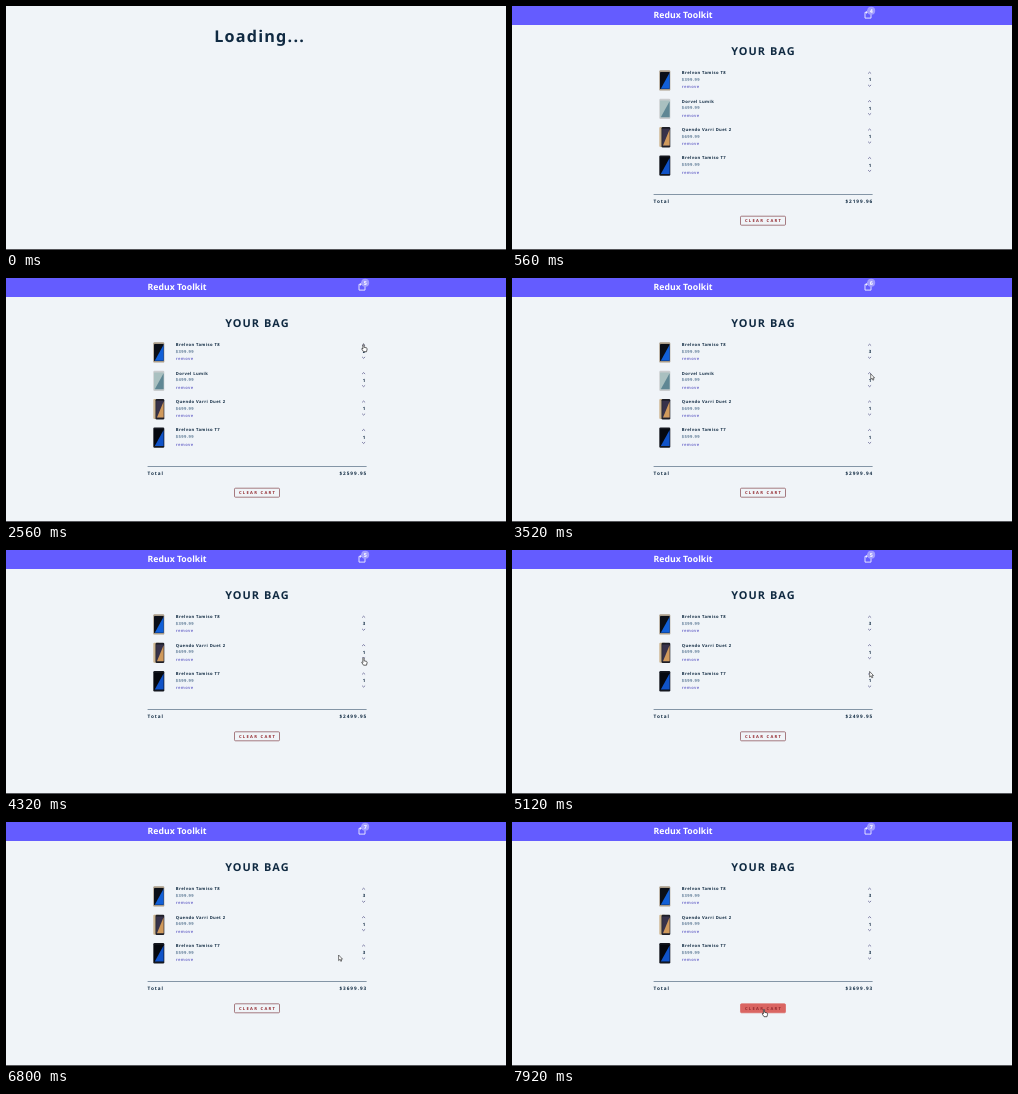
Animation of 500x244 px, one loop 8 s. Source, as an HTML page:

```html
<!DOCTYPE html>
<html lang="en">
<head>
<meta charset="utf-8">
<title>Shopping bag</title>
<style>
  html, body { margin: 0; width: 100%; height: 100%; overflow: hidden; background: #f0f4f8; }
  svg { display: block; width: 500px; height: 244px; }
  text { font-family: "Noto Sans", "Open Sans", sans-serif; font-weight: 700; text-rendering: geometricPrecision; }
</style>
</head>
<body>
<svg id="stage" viewBox="0 0 500 244"></svg>
<script>
const LOOP = 8000, LOADED = 480, HOVER = 7440;
const NAVY = '#102a42', PURPLE = '#645cff', GREY = '#617d98';
const stage = document.getElementById('stage');

const items = [
  { name: 'Brelvon Tamiso T8', price: 399.99, frame: '#a89a86', screen: '#0b0f18', glow: '#1260d8', steps: [2120, 2880] },
  { name: 'Dorvel Lumik', price: 499.99, frame: '#c9ccce', screen: '#a9c0c0', glow: '#5f8794', removed: 3920 },
  { name: 'Quendo Varri Duet 2', price: 699.99, frame: '#1d1e26', screen: '#37324a', glow: '#d09a5c', back: '#cdb692' },
  { name: 'Brelvon Tamiso T7', price: 599.99, frame: '#14171f', screen: '#05080f', glow: '#1053c8', steps: [5920, 6320] }
];

// time, x, y of the pointer tip, and its shape from then on
const track = [
  [960, 372, 108, 'arrow'], [1440, 366, 69, 'arrow'], [1680, 366, 69, 'arrow'],
  [1920, 357.5, 66, 'hand'], [3200, 357.5, 66, 'hand'], [3280, 361, 74, 'arrow'],
  [3680, 357.5, 107.5, 'hand'], [4480, 357.5, 107.5, 'hand'], [4560, 361, 110, 'arrow'],
  [5200, 357.5, 122, 'hand'], [5760, 357.5, 122, 'ring'], [5920, 357.5, 122, 'hand'],
  [6400, 357.5, 122, 'hand'], [6480, 353, 126, 'arrow'],
  [6720, 332.6, 133, 'arrow'], [6960, 332.6, 133, 'arrow'],
  [HOVER, 252, 187, 'hand'], [LOOP, 252, 187, 'hand']
];

const shapes = {
  arrow: '<path d="M0 0v5.6l1.3-1.2.9 2 .9-.4-.9-1.9h1.7z" fill="#fff" stroke="#222" stroke-width=".6"/>',
  hand: '<path d="M-.6.7q.6-1.1 1.2 0v2.6l2.4.6q.8.3.6 1.3l-.6 2.5H0L-1.7 5.1q-.1-1 .7-.6l.4.4z" fill="#fff" stroke="#222" stroke-width=".7"/>',
  ring: '<circle cx="1.6" cy="4.2" r="2.9" fill="#f7f9fb" stroke="#333" stroke-width=".7" stroke-dasharray="5 1.5"/>'
};

const text = (s, x, y, size, fill, gap = 0, anchor = 'start') =>
  `<text x="${x}" y="${y}" font-size="${size}" fill="${fill}" letter-spacing="${gap}" text-anchor="${anchor}">${s}</text>`;

const rect = (x, y, w, h, fill, rx = 0, extra = '') =>
  `<rect x="${x}" y="${y}" width="${w}" height="${h}" rx="${rx}" fill="${fill}" ${extra}/>`;

const chevron = (y, up) =>
  `<path d="M356.1 ${y}l1.5 ${up ? -1.4 : 1.4} 1.5 ${up ? 1.4 : -1.4}" fill="none" stroke="#514f85" stroke-width=".7"/>`;

const count = (item, t) => 1 + (item.steps || []).filter(s => t >= s).length;

function phone(item, y) {
  const x = item.back ? 149.5 : 147.3, w = 158.3 - x;
  return (item.back ? rect(147.3, y, 6, 20, item.back, 1) : '') +
    rect(x, y, w, 20.3, item.frame, 1.2) +
    rect(x + .7, y + 1.7, w - 1.4, 16.9, item.screen, .4) +
    `<path d="M157.6 ${y + 2.5}v16h-${w - 2.2}z" fill="${item.glow}"/>`;
}

function row(item, y, t) {
  return phone(item, y - 2) +
    text(item.name, 169.8, y + 1.8, 4.15, NAVY, .4) +
    text('$' + item.price, 169.8, y + 8.4, 4.1, GREY, .42) +
    text('remove', 169.8, y + 16.1, 4.1, '#7c79cf', .38) +
    chevron(y + 1.3, true) + chevron(y + 12.6, false) +
    text(count(item, t), 357.9, y + 9, 4.4, NAVY, 0, 'middle');
}

function header(n) {
  return rect(0, 0, 500, 19, PURPLE) +
    text('Redux Toolkit', 141.6, 12.2, 8.7, '#fff') +
    '<path d="M353 6.3h6v5.8h-6zM354.4 7.6V5.7q1.6-2.4 3.2 0v1.9" fill="none" stroke="#fff" stroke-width=".8"/>' +
    '<circle cx="359.2" cy="4.8" r="4" fill="#a29dff"/>' +
    text(n, 359.2, 6.8, 5.4, '#fff', 0, 'middle');
}

function bag(t) {
  const list = items.filter(i => !(t >= i.removed));
  const total = list.reduce((sum, i) => sum + i.price * count(i, t), 0);
  const n = list.reduce((sum, i) => sum + count(i, t), 0);
  const end = 188 - (4 - list.length) * 28.4;
  const hover = Math.max(0, Math.min(1, (t - HOVER) / 300));
  return header(n) +
    text('YOUR BAG', 251.4, 48.8, 10.9, NAVY, 1.05, 'middle') +
    list.map((item, i) => row(item, 66.3 + i * 28.4, t)).join('') +
    rect(141.6, Math.floor(end), 219, 1, '#8495a6') +
    text('Total', 141.6, end + 8.7, 4.7, NAVY, .95) +
    text('$' + total.toFixed(2), 361.2, end + 8.7, 4.7, NAVY, .95, 'end') +
    rect(228.5, end + 22.2, 45, 9, '#da6562', 1, `fill-opacity="${hover}" stroke="${hover > .5 ? '#da6562' : '#85454c'}" stroke-width=".7"`) +
    text('CLEAR CART', 251.6, end + 28.3, 4.1, '#93282e', 1.3, 'middle');
}

function pointer(t) {
  const i = track.findIndex(k => t < k[0]);
  if (i < 1) return '';
  const [t0, x0, y0, shape] = track[i - 1], [t1, x1, y1] = track[i];
  const p = (t - t0) / (t1 - t0), e = p * p * (3 - 2 * p);
  return `<g transform="translate(${x0 + (x1 - x0) * e} ${y0 + (y1 - y0) * e})">${shapes[shape]}</g>`;
}

function draw(now) {
  const t = now % LOOP;
  stage.innerHTML = rect(0, 0, 500, 244, '#f0f4f8') +
    (t < LOADED ? text('Loading...', 253.6, 36, 16.2, NAVY, 1.2, 'middle') : bag(t) + pointer(t)) +
    rect(0, 243, 500, 1, '#55565a');
}

const start = performance.now();
function tick() {
  draw(performance.now() - start);
  requestAnimationFrame(tick);
}
tick();
</script>
</body>
</html>
```
